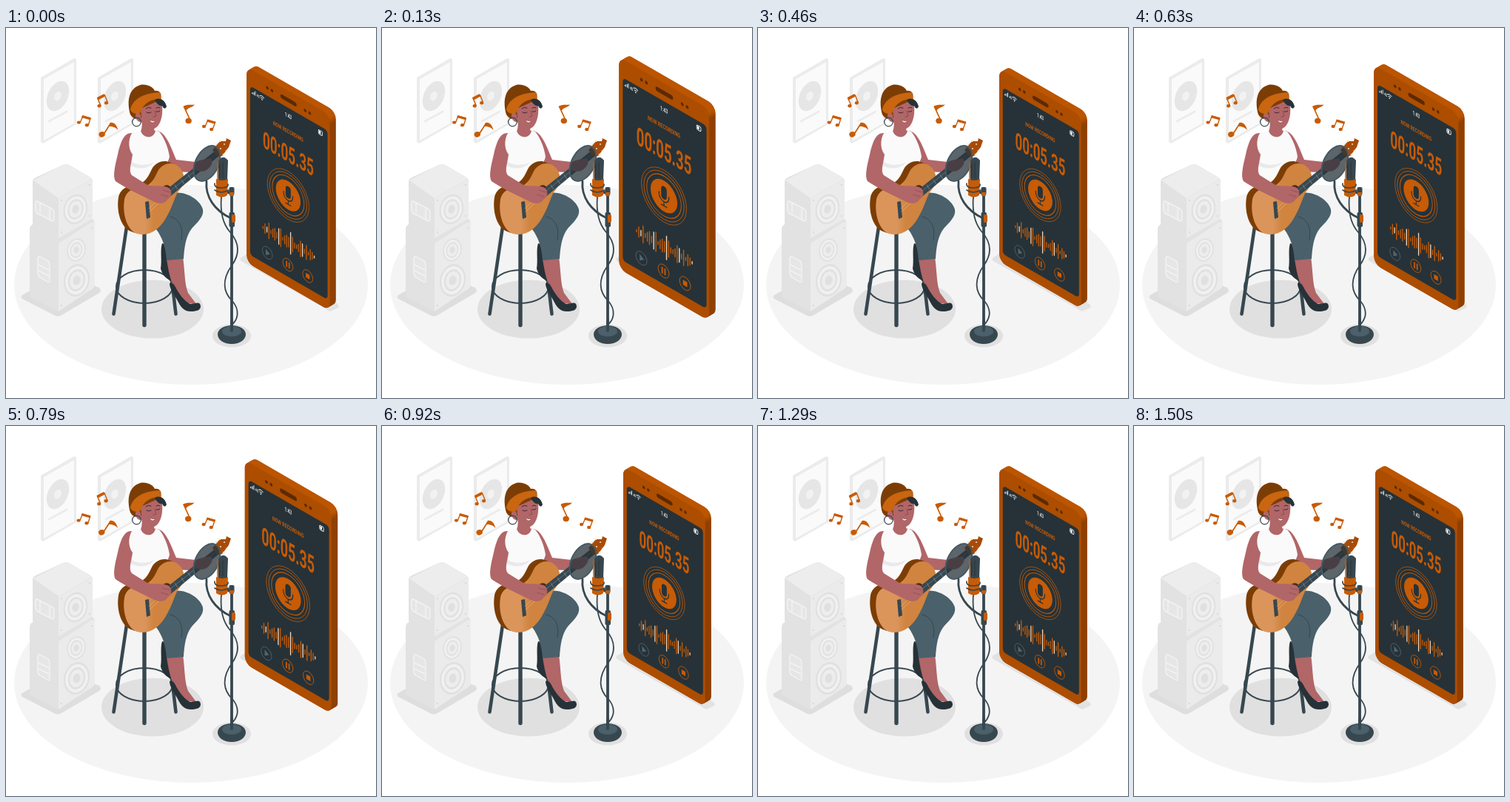
Animation of 500x500 px, one loop 1540 ms. Source, as an HTML page:

```html
<!DOCTYPE html>
<html lang="en">
<head>
<meta charset="utf-8">
<title>Recording session</title>
<style>
  html, body { margin: 0; width: 100%; height: 100%; overflow: hidden; background: #fff; }
  svg { display: block; width: 100%; height: 100%; }
  text { font-family: Roboto, "Open Sans", sans-serif; text-anchor: middle; }
  .line { fill: none; stroke-linecap: round; stroke-linejoin: round; }
  .accent { fill: #c75b06; }
  .ring { fill: none; stroke: #c75b06; }
  .skin { fill: #b16668; }
  .dark { fill: #263238; }
</style>
</head>
<body>
<svg viewBox="0 0 500 500">
  <defs>
    <g id="poster">
      <path d="M47 67 92 41 95 42V130L50 156 47 154Z" fill="#ebebeb"/>
      <path d="M51 69 92 46V129L51 152Z" fill="#fafafa"/>
      <ellipse cx="70" cy="92" rx="13.5" ry="21.5" transform="rotate(25 70 92)" fill="#e6e6e6"/>
      <ellipse cx="70" cy="92" rx="4.5" ry="6.5" transform="rotate(25 70 92)" fill="#f2f2f2"/>
      <path class="line" d="M58 126 82 113" stroke="#ebebeb" stroke-width="2.6"/>
    </g>
    <g id="cone">
      <ellipse rx="16" ry="20.5" fill="#e0e0e0"/>
      <ellipse rx="14" ry="18" fill="#f0f0f0"/>
      <ellipse rx="10.5" ry="14" fill="#e0e0e0"/>
      <ellipse rx="8.5" ry="11.5" fill="#ededed"/>
      <ellipse rx="4.5" ry="6" fill="#e0e0e0"/>
    </g>
    <linearGradient id="wood">
      <stop offset=".35" stop-color="#db955a"/>
      <stop offset=".5" stop-color="#d0843f"/>
    </linearGradient>
    <linearGradient id="edge" x2="0" y2="1">
      <stop offset=".02" stop-color="#bb5500"/>
      <stop offset=".05" stop-color="#8f4000"/>
    </linearGradient>
    <path id="body" d="M206 192C214 181 228 180 236 190 244 201 240 213 232 222 227 231 225 242 216 257 207 273 193 282 177 278 163 273 157 250 160 232 163 217 178 215 190 213 199 209 202 199 206 192Z"/>
  </defs>

  <ellipse cx="250" cy="347" rx="239" ry="135" fill="#f4f4f4"/>
  <use href="#poster"/>
  <use href="#poster" x="77"/>

  <!-- speakers -->
  <path d="M22 361 74 331 126 351Q130 355 126 358L75 388Q70 391 65 388L22 366Q19 363 22 361Z" fill="#dedede"/>
  <path d="M32 271Q32 267 38 264L78 246 117 258 120 262V349L74 381Q70 384 66 381L32 363Z" fill="#e2e2e2"/>
  <path d="M71 291 116 262Q120 260 120 265V346Q120 350 116 353L71 383Z" fill="#ebebeb"/>
  <path d="M36 208Q36 204 40 202L77 185Q82 183 87 186L114 202Q117 204 117 208V255L75 282Q71 285 67 282L36 264Z" fill="#e2e2e2"/>
  <path d="M37 206 77 185Q82 183 87 186L116 204 71 230Z" fill="#ededed"/>
  <path d="M71 230 114 206Q117 205 117 209V254Q117 258 113 260L71 284Z" fill="#ebebeb"/>
  <use href="#cone" transform="translate(94 245) rotate(14)"/>
  <use href="#cone" transform="translate(95 300) rotate(14) scale(.78)"/>
  <use href="#cone" transform="translate(95.500 341) rotate(14) scale(1.08)"/>
  <g fill="#e6e6e6" stroke="#f3f3f3" stroke-width="1.4">
    <path d="M42 234 62 244Q65 246 65 250V258Q65 262 61 260L43 251Q40 249 40 245V237Q40 233 42 234ZM46 237V251M59 244V258"/>
    <path d="M46 309 57 315Q59 317 59 320V341Q59 345 56 343L46 337Q43 335 43 332V312Q43 308 46 309ZM44 320 58 327M44 328 58 335"/>
  </g>
  <g fill="#dcdcdc">
    <circle cx="75" cy="233" r="1.300"/><circle cx="113" cy="212" r="1.300"/><circle cx="75" cy="276" r="1.300"/>
    <circle cx="113" cy="254" r="1.300"/><circle cx="75" cy="375" r="1.300"/><circle cx="116" cy="270" r="1.300"/>
  </g>

  <!-- floor shadows -->
  <ellipse cx="198" cy="380" rx="69" ry="39.5" fill="#e0e0e0"/>
  <ellipse cx="305" cy="416" rx="26" ry="15.5" fill="#e0e0e0"/>
  <path d="M318 310 328 304 448 373Q452 377 447 379L438 383 318 315Q315 312 318 310Z" fill="#e2e2e2"/>

  <!-- stool -->
  <g class="line" stroke="#37474f">
    <ellipse cx="187" cy="349.500" rx="38" ry="22.500" stroke-width="2"/>
    <path d="M164 262 145.500 386.500M216 272 229.500 386.500" stroke-width="4.600"/>
    <path d="M187 268V401.500" stroke-width="5.400"/>
  </g>
  <path d="M160 228C180 220 215 224 222 250 218 270 180 278 168 264Z" fill="#37474f"/>

  <!-- legs -->
  <path class="dark" d="M211 291C208 300 211 314 209 325 211 334 218 341 226 342 227 334 223 325 218 316 217 308 216 300 218 293Z"/>
  <path class="skin" d="M217 311 239 309C242 330 241 345 246 358L258 374 238 370C225 352 220 335 217 311Z"/>
  <path class="dark" d="M221 345C224 343 227 346 229 350 234 360 241 369 249 373 256 373 262 368 263 376 263 381 258 383 250 383 240 383 236 377 231 367 226 358 221 352 221 345Z"/>
  <path d="M198 258 222 224C240 218 262 231 266 245 268 255 258 263 251 271 243 281 241 296 240 312L217 314C216 298 212 284 203 272Z" fill="#4a606a"/>
  <path class="line" d="M222 255C234 258 240 268 237 286" stroke="#37474f" stroke-width="1"/>

  <!-- torso and head -->
  <path class="skin" d="M205 139C216 142 222 158 230 178L256 181C264 179 270 181 270 187 266 194 258 195 250 195 236 195 220 192 212 186L203 160Z"/>
  <path class="skin" d="M183 119 202 128 200 138 207 141C210 153 192 156 176 146 183 142 185 136 183 119Z"/>
  <path d="M168 142C173 141 178 139 182 139 185 149 199 151 202 139L207 140C213 147 219 160 221 174 219 184 211 190 205 198L190 214 168 216C164 204 164 193 166 184 163 168 164 154 168 142Z" fill="#fafafa"/>
  <path d="M167 178C174 186 189 187 201 181 192 191 177 192 167 185Z" fill="#e9e9e9"/>
  <path d="M181 104 207 96C211 101 212 108 211 116 210 126 206 134 200 136 191 138 184 130 181 123Z" class="skin"/>
  <path d="M168 117C163 99 166 83 179 78 187 74 199 79 201 85 208 84 211 89 209 97L182 109 183 121C176 125 171 122 168 117Z" fill="#7c3d05"/>
  <path d="M168 111C170 98 183 88 208 87L210 97C197 95 186 101 182 114 177 117 171 116 168 111Z" fill="#c9660f"/>
  <path class="dark" d="M201 97C207 93 215 97 217 106 215 111 212 108 211 105 208 106 204 103 201 97Z"/>
  <path d="M175 120C174 114 180 112 182 118L182 127C178 127 176 124 175 120Z" class="skin"/>
  <circle cx="176.500" cy="127" r="5.800" class="line" stroke="#37474f" stroke-width="1.200"/>
  <path class="line" d="M189 109Q192 106 196 108M203 108Q206 106 208 108M190 114Q193 116 196 114M203 113Q206 114 208 112" stroke="#3c2a32" stroke-width="1"/>
  <path class="line" d="M201 112 203 119 199 120" stroke="#8d484e" stroke-width=".9"/>
  <path d="M194 124Q198 127 202 125 200 128 198 128 195 127 194 124Z" fill="#fff" stroke="#843c43" stroke-width=".5"/>

  <!-- guitar -->
  <use href="#body" x="-8" y="-3" fill="#7c3d05"/>
  <use href="#body" x="-4" y="-1.500" fill="#7c3d05"/>
  <use href="#body" fill="url(#wood)"/>
  <ellipse cx="216" cy="222" rx="8" ry="10" transform="rotate(25 216 222)" fill="#4d2b16"/>
  <path d="M188 235 193 234 195 256 190 258Z" fill="#37474f"/>
  <path class="line" d="M193 244 217 221M194 248 219 225" stroke="#f0c79c" stroke-width=".5"/>
  <path d="M211 223 284 165 290 171 219 230Z" fill="#37474f"/>
  <path class="line" d="M216 225 287 168" stroke="#78909c" stroke-width=".6"/>
  <path class="line" d="M228 212 232 218M237 205 241 211M246 198 250 204M255 190 259 196" stroke="#90a4ae" stroke-width=".6"/>
  <path d="M279 165 289 153 297 153 298 149 304 152 301 161 292 173 286 174Z" fill="#a94b06"/>
  <g fill="#f0e0cc"><circle cx="284" cy="157" r="1.300"/><circle cx="289" cy="153" r="1.300"/><circle cx="294" cy="171" r="1.300"/><circle cx="298" cy="166" r="1.300"/><circle cx="290" cy="163" r="1"/><circle cx="295" cy="157" r="1"/></g>
  <path class="skin" d="M253 184C259 178 268 178 276 176 281 180 278 187 271 192 263 196 255 194 253 184Z"/>
  <path class="skin" d="M170 142C160 141 155 153 151 171 147 187 144 201 148 207 160 215 181 226 197 233 207 239 215 238 219 231 226 226 224 218 218 215 209 212 201 215 191 212L170 199C165 193 170 181 171 171 165 163 165 151 170 142Z"/>
  <path class="line" d="M212 219 222 222M210 225 219 228" stroke="#934c52" stroke-width=".8"/>

  <!-- microphone -->
  <ellipse cx="271.500" cy="183" rx="15.500" ry="25.500" transform="rotate(26 271.500 183)" fill="#263238" fill-opacity=".75" stroke="#455a64" stroke-width="2"/>
  <g class="line" stroke="#37474f">
    <path d="M271 207C269 228 282 247 304 257" stroke-width="2.800"/>
    <path d="M291 228C289 252 294 266 303 276 316 291 316 306 305 321 291 341 294 357 305 368 317 381 314 395 303 403" stroke-width="1.800"/>
    <path d="M305 220V406" stroke-width="3.800"/>
    <path d="M298 221 305 224" stroke-width="4"/>
  </g>
  <path d="M286 414C286 407 294 402 305 402S324 407 324 414 316 427 305 427 286 421 286 414Z" fill="#37474f"/>
  <ellipse cx="305" cy="410" rx="13" ry="7" fill="#4b606a"/>
  <path class="line" d="M305 395V409" stroke="#37474f" stroke-width="4"/>
  <path d="M287 180Q293 170 300 179L299 206H287Z" fill="#37474f"/>
  <path class="line" d="M289 184V202M293 182V203" stroke="#263238" stroke-width="1"/>
  <path d="M284 204Q292 208 300 204L299 226Q292 231 284 226Z" fill="#c75b06"/>
  <path class="line" d="M286 181V205" stroke="#c75b06" stroke-width="1.600"/>
  <path class="line" d="M282 210Q281 216 291 216T300 211M282 219Q290 225 301 219" stroke="#37474f" stroke-width="1.600"/>
  <rect x="301.500" y="215" width="7" height="11" rx="2" fill="#37474f"/>
  <rect x="302" y="222" width="6" height="5" rx="1" class="accent"/>
  <rect x="301.500" y="249" width="7.500" height="20" rx="2" fill="#37474f"/>
  <rect x="305" y="252" width="5" height="11" rx="2" class="accent"/>

  <g id="phone">
    <g id="rim"></g>
    <g transform="translate(326 57) matrix(.866 .5 0 1 0 0)">
      <rect y="-2" width="128" height="260.500" rx="10" fill="#ad4d00"/>
      <rect x="5.500" y="20.500" width="119" height="225" rx="5" class="dark"/>
      <g fill="#5b2a04">
        <circle cx="32" cy="10" r="2"/><circle cx="39" cy="10" r="2"/>
        <rect x="52" y="7.500" width="25" height="5.500" rx="2.700"/>
        <circle cx="90" cy="11" r="2"/><circle cx="97" cy="11" r="2"/>
      </g>
      <g fill="#fff">
        <g transform="translate(1.200 2.500) scale(.85)">
          <path d="M8 32V30H9V32ZM10 32V28.500H11V32ZM12 32V27H13V32ZM14 32V25H15V32Z"/>
          <text x="19.500" y="32" font-size="6" font-weight="500" transform="translate(5.500) scale(.72 1)">4G</text>
          <circle cx="26.500" cy="32" r="1"/>
          <path class="line" d="M24.500 29.800Q26.500 28 28.500 29.800M22.800 27.600Q26.500 24.500 30.200 27.600" stroke="#fff"/>
        </g>
        <text y="33.500" font-size="7.600" font-weight="500" transform="translate(64) scale(.7 1)">1:43</text>
        <rect x="110.500" y="26" width="6" height="5.500" rx="1.500" fill="none" stroke="#fff" stroke-width=".9"/>
        <rect x="111.300" y="27" width="2.700" height="3.500"/>
      </g>
      <g class="accent" font-weight="700">
        <text y="54.500" font-size="7.600" transform="translate(64) scale(.76 1)">NOW RECORDING</text>
        <text y="92.500" font-size="31" transform="translate(64) scale(.63 1)">00:05.35</text>
      </g>
      <g transform="translate(64 137)">
        <circle r="32" class="ring" stroke-width=".7"/>
        <circle r="28.500" class="ring" stroke-width=".8"/>
        <circle r="24.500" class="ring" stroke-width="1"/>
        <circle r="19" class="accent"/>
        <rect x="-4" y="-12" width="8" height="16" rx="4" class="dark"/>
        <path class="line" d="M-7-2V0A7 7 0 0 0 7 0V-2M0 7V12M-4 12H4" stroke="#263238" stroke-width="1.300"/>
      </g>
      <g id="wave"></g>
      <g stroke-width=".8">
        <circle cx="32" cy="229.500" r="7.800" fill="none" stroke="#53656d"/>
        <path d="M29.500 225.500V233.500L36 229.500Z" fill="#53656d"/>
        <circle cx="63.500" cy="229.500" r="7.800" class="ring"/>
        <path d="M60.500 225.500H62.500V233.500H60.500ZM64.500 225.500H66.500V233.500H64.500Z" class="accent"/>
        <circle cx="94" cy="229.500" r="7.800" class="ring"/>
        <rect x="91" y="226.500" width="6" height="6" class="accent"/>
      </g>
    </g>
  </g>

  <g id="notes" class="accent">
    <path class="line" d="M128 104.500 124 95 133.500 90.500 137.500 100.500" stroke="#c75b06" stroke-width="1.400"/>
    <path d="M123 94 132.500 89 134 92.500 124.500 97.500Z"/>
    <ellipse cx="126.200" cy="105.200" rx="2.600" ry="2.200"/><ellipse cx="135.700" cy="101.200" rx="2.600" ry="2.200"/>
    <path class="line" d="M100.500 127.500 104 119 114.300 122 111.500 131" stroke="#c75b06" stroke-width="1.400"/>
    <path d="M103.300 118 115 121.300 113.800 124.300 102.200 121Z"/>
    <ellipse cx="98.600" cy="127.600" rx="2.600" ry="2.200"/><ellipse cx="109.500" cy="131.300" rx="2.600" ry="2.200"/>
    <path class="line" d="M132.500 143 141.500 129" stroke="#c75b06" stroke-width="1.700"/>
    <path d="M141 128C146 127 150 131 151.500 138 147 133 143 133 139 133Z"/>
    <ellipse cx="129.800" cy="143.800" rx="4.200" ry="3.700" transform="rotate(-20 129.800 143.800)"/>
    <path class="line" d="M249 124.500 241 107" stroke="#c75b06" stroke-width="1.700"/>
    <path d="M239.500 106C244 103 250 104 255 103.500 252 108 246 107 243.500 112Z"/>
    <ellipse cx="246.800" cy="125.500" rx="4.200" ry="3.700"/>
    <path class="line" d="M269.500 132.500 273 124.500 282.800 127.500 279.500 136.500" stroke="#c75b06" stroke-width="1.400"/>
    <path d="M272.300 123.500 283.700 126.700 282.500 129.700 271.200 126.500Z"/>
    <ellipse cx="267.700" cy="133" rx="2.600" ry="2.200"/><ellipse cx="277.800" cy="137" rx="2.600" ry="2.200"/>
  </g>
</svg>
<script>
  const $ = id => document.getElementById(id);

  function add(parent, name, attrs) {
    const el = document.createElementNS('http://www.w3.org/2000/svg', name);
    for (const key in attrs) el.setAttribute(key, attrs[key]);
    parent.append(el);
  }

  // Thickness of the phone, from the back edge to the front.
  for (let d = 8; d > 0; d -= 0.5) {
    add($('rim'), 'rect', {
      y: -2, width: 128, height: 260.5, rx: 10, fill: 'url(#edge)',
      transform: `translate(${326 + d} ${57 - d * 0.577}) matrix(.866 .5 0 1 0 0)`
    });
  }

  const bars = [4, 14, 8, 22, 6, 12, 17, 9, 22, 25, 5, 12, 17, 14, 30, 21, 8, 6, 11, 22, 18, 7, 20, 5, 15, 10, 4];
  bars.forEach((h, i) => add($('wave'), 'rect', {
    x: 24.5 + i * 3.03, y: 199 - h / 2, width: 1.5, height: h, rx: 0.7,
    fill: i % 6 === 2 ? '#f2d3b8' : '#c75b06'
  }));

  const LOOP = 1540, FRAME = 1000 / 24, CYCLE = 1500, LEAD = 23;
  const beat = [[0, 1], [.1, 1.1], [.3, 1], [.4, 1], [.5, 1.1], [.6, 1], [1, 1]];
  const shake = [[0, 0], [.1, -1], [.2, 2], [.3, -4], [.4, 4], [.5, -4], [.6, 4], [.7, -4], [.8, 2], [.9, -1], [1, 0]];

  function at(keys, p) {
    const i = Math.max(1, keys.findIndex(k => k[0] >= p));
    const [p0, v0] = keys[i - 1], [p1, v1] = keys[i];
    return v0 + (v1 - v0) * (p - p0) / (p1 - p0);
  }

  // The motion holds at 24 steps per second, on a 10 ms clock.
  function draw(now) {
    const t = Math.floor(now % LOOP / 10) * 10;
    const step = Math.floor((t + 4.9) / FRAME);
    const p = Math.min(1, (step * FRAME + LEAD) / CYCLE);
    $('phone').setAttribute('transform', `translate(385.5 215) scale(${at(beat, p)}) translate(-385.5 -215)`);
    $('notes').setAttribute('transform', `translate(${at(shake, p)} 0)`);
  }

  const start = performance.now();
  function tick() {
    draw(performance.now() - start);
    requestAnimationFrame(tick);
  }
  tick();
</script>
</body>
</html>
```
